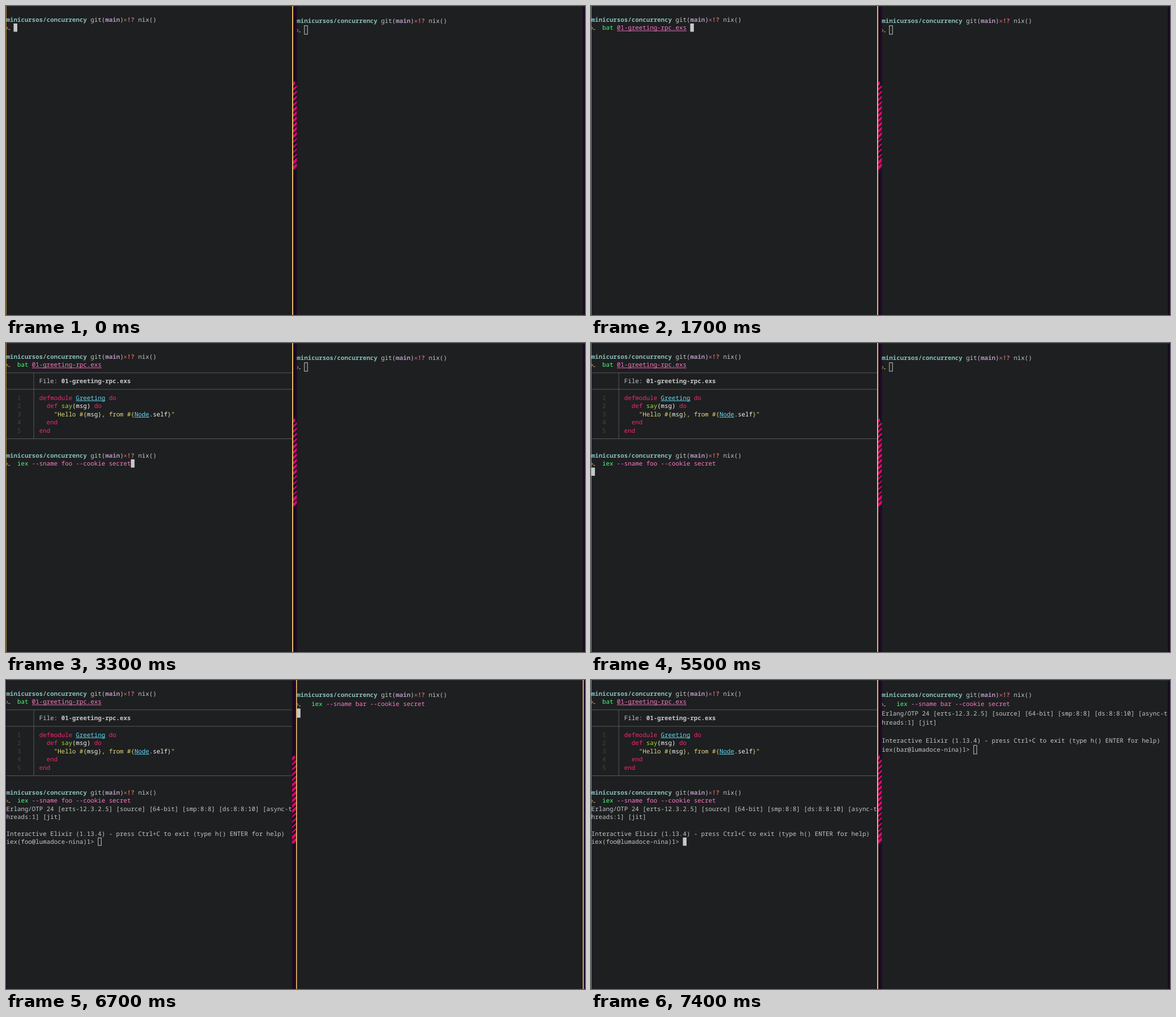
Animation, 1024 px wide and 547 px high, one loop 8 s. Source, as an HTML page:

```html
<!DOCTYPE html>
<html lang="en">
<head>
<meta charset="utf-8">
<title>Two terminals</title>
<style>
  html, body { margin: 0; width: 100%; height: 100%; overflow: hidden; background: #1d1f21; }
  svg { display: block; width: 100vw; height: 100vh; }
  text {
    font: 10.8px "Noto Sans Mono", "DejaVu Sans Mono", monospace;
    white-space: pre;
    text-rendering: geometricPrecision;
  }
  .bold { font-weight: 700; }
</style>
</head>
<body>
<svg id="stage" viewBox="0 0 1024 547" preserveAspectRatio="none"></svg>
<script>
const LOOP = 8000;
const CELL = 6.48;
const stage = document.getElementById('stage');

const C = {
  bg: '#1d1f21', fg: '#c5c8c6', teal: '#8abeb7', purple: '#b294bb', red: '#cc6666',
  prompt: '#d5b564', cmd: '#50fa7b', arg: '#ff79c6', hint: '#62666a',
  key: '#f92672', type: '#66d9ef', func: '#a6e22e', str: '#e6db74', code: '#f8f8f2',
  num: '#444444', grid: '#56585a', wall: '#1c0a22', stripe: '#d9046e',
  focus: '#f3c26b', edge: '#a87c3c', top: '#2b2c2f'
};

const left = { x: 0.5, y: 1.8, pitch: 14.58, base: 11.3 };
const right = { x: 514.3, y: 2, pitch: 16.17, base: 12 };
const timed = [];

function add(tag, attrs, parent = stage) {
  const el = document.createElementNS('http://www.w3.org/2000/svg', tag);
  for (const k in attrs) el.setAttribute(k, attrs[k]);
  parent.appendChild(el);
  return el;
}

function rect(x, y, width, height, fill, parent) {
  return add('rect', { x, y, width, height, fill }, parent);
}

function during(from, to = LOOP) {
  const el = add('g', {});
  timed.push({ el, from, to });
  return el;
}

const colX = (pane, col) => pane.x + col * CELL;
const rowY = (pane, row) => pane.y + row * pane.pitch;

// Each part is [colour, text, style]; style: b = bold, u = underlined
function write(parent, pane, row, col, ...parts) {
  const y = rowY(pane, row) + pane.base;
  for (const [color, str, style = ''] of parts) {
    const x = colX(pane, col);
    const el = add('text', { x, y, fill: C[color] }, parent);
    el.textContent = str;
    if (style === 'b') el.setAttribute('class', 'bold');
    if (style === 'u') rect(x, y + 1.3, str.length * CELL, 0.9, C[color], parent);
    col += str.length;
  }
}

function prompt(parent, pane, row) {
  write(parent, pane, row, 0,
    ['teal', 'minicursos/concurrency', 'b'], ['fg', ' git('], ['purple', 'main', 'b'],
    ['fg', ')'], ['red', '✕', 'b'], ['red', '!?', 'b'], ['fg', ' nix()']);
  const y = rowY(pane, row + 1) + pane.base;
  add('path', {
    d: `M${pane.x + 0.3} ${y - 5.2}l2.5 2.2l-2.5 2.2M${pane.x + 3.6} ${y - 0.6}h3.2`,
    fill: 'none', stroke: C.prompt, 'stroke-width': 1
  }, parent);
}

function banner(pane, row, node, start) {
  const head = during(start);
  write(head, pane, row, 0,
    ['fg', 'Erlang/OTP 24 [erts-12.3.2.5] [source] [64-bit] [smp:8:8] [ds:8:8:10] [async-t']);
  write(head, pane, row + 1, 0, ['fg', 'hreads:1] [jit]']);
  const shell = during(start + 100);
  write(shell, pane, row + 3, 0,
    ['fg', 'Interactive Elixir (1.13.4) - press Ctrl+C to exit (type h() ENTER for help)']);
  write(shell, pane, row + 4, 0, ['fg', `iex(${node}@lumadoce-nina)1> `]);
}

// Desktop strip between the windows
rect(0, 0, 1024, 547, C.bg);
rect(506, 0, 8.4, 547, C.wall);
rect(1020, 0, 4, 547, C.wall);
const clip = add('clipPath', { id: 'strip' });
add('path', { d: 'M506 136L511 131.5V138L514.4 140V287L511 290H506Z' }, clip);
const stripes = add('g', { 'clip-path': 'url(#strip)', stroke: C.stripe });
for (let i = 0; i < 17; i++) {
  const y = 136.5 + i * 9.27;
  const w = i < 1 ? 4.5 : i < 5 ? 3 : i < 11 ? 4.4 : i < 15 ? 2.2 : 5;
  add('path', { d: `M504 ${y + 5.5}L517 ${y - 6}`, 'stroke-width': w }, stripes);
}
rect(0, 0, 1024, 1, C.top);

// Focus borders
for (const [from, to] of [[0, 6000], [7400, LOOP]]) {
  const g = during(from, to);
  rect(0, 0, 1, 547, C.edge, g);
  rect(506, 0, 1.9, 547, C.focus, g);
}
const rightFocus = during(6000, 7400);
rect(0, 0, 1, 547, C.wall, rightFocus);
rect(513, 0, 1.6, 547, C.focus, rightFocus);
rect(1020, 0, 1.7, 547, C.focus, rightFocus);

// Cursor moves: [time, column, row]
const cursors = [
  {
    pane: left, el: rect(0, 0, 0, 0, C.fg),
    solid: t => t < 5900 || t >= 7400,
    moves: [[0, 2, 2], [400, 3, 2], [700, 4, 2], [800, 5, 2], [900, 6, 2], [1100, 7, 2],
      [1400, 8, 2], [1500, 9, 2], [1700, 27, 2], [2100, 0, 3], [2200, 2, 14],
      [3300, 34, 14], [5500, 0, 15], [5600, 0, 17], [5700, 25, 19]]
  },
  {
    pane: right, el: rect(0, 0, 0, 0, C.fg),
    solid: t => t >= 6000 && t < 7200,
    moves: [[0, 2, 2], [6200, 35, 2], [6700, 0, 3], [6900, 0, 5], [7000, 25, 7]]
  }
];

// Left window: show the file
const always = during(0);
prompt(always, left, 1);
prompt(always, right, 1);
[...'bat'].forEach((ch, i) => write(during(700 + i * 100), left, 2, 3 + i, ['cmd', ch]));
const file = '01-greeting-rpc.exs';
for (const [n, from, to] of [[1, 1400, 1500], [2, 1500, 1700], [file.length, 1700, LOOP]]) {
  write(during(from, to), left, 2, 7, ['arg', file.slice(0, n), 'u'], ['hint', file.slice(n)]);
}

const listing = during(2200);
const mid = row => rowY(left, row) + left.pitch / 2;
for (const row of [3, 5, 11]) rect(0.5, mid(row) - 0.5, 505.4, 1, C.grid, listing);
rect(48.6, mid(3), 1, mid(11) - mid(3), C.grid, listing);
write(listing, left, 4, 9, ['fg', 'File: '], ['fg', file, 'b']);
for (let n = 1; n <= 5; n++) write(listing, left, 5 + n, 3, ['num', String(n)]);
write(listing, left, 6, 9, ['key', 'defmodule '], ['type', 'Greeting', 'u'], ['key', ' do']);
write(listing, left, 7, 11, ['key', 'def '], ['func', 'say'], ['code', '(msg) '], ['key', 'do']);
write(listing, left, 8, 13, ['str', '"Hello #{'], ['code', 'msg'], ['str', '}, from #{'],
  ['type', 'Node', 'u'], ['code', '.self'], ['str', '}"']);
write(listing, left, 9, 11, ['key', 'end']);
write(listing, left, 10, 9, ['key', 'end']);
prompt(listing, left, 13);

// Start a shell in each window
write(during(3300), left, 14, 3, ['cmd', 'iex'], ['arg', ' --sname foo --cookie secret']);
banner(left, 15, 'foo', 5600);
write(during(6200), right, 2, 4, ['cmd', 'iex'], ['arg', ' --sname bar --cookie secret']);
banner(right, 3, 'bar', 6900);

function placeCursor({ pane, el, solid, moves }, t) {
  const [, col, row] = moves.filter(m => m[0] <= t).pop();
  const full = solid(t);
  const inset = full ? 0 : 0.5;
  const attrs = {
    x: colX(pane, col) + inset, y: rowY(pane, row) + inset,
    width: CELL - inset * 2, height: pane.pitch - inset * 2,
    fill: full ? C.fg : 'none', stroke: full ? 'none' : C.fg
  };
  for (const k in attrs) el.setAttribute(k, attrs[k]);
}

function draw(t) {
  for (const { el, from, to } of timed) {
    el.setAttribute('display', t >= from && t < to ? 'inline' : 'none');
  }
  for (const cursor of cursors) placeCursor(cursor, t);
}

const start = performance.now();
function tick() {
  draw((performance.now() - start) % LOOP);
  requestAnimationFrame(tick);
}
tick();
</script>
</body>
</html>
```
